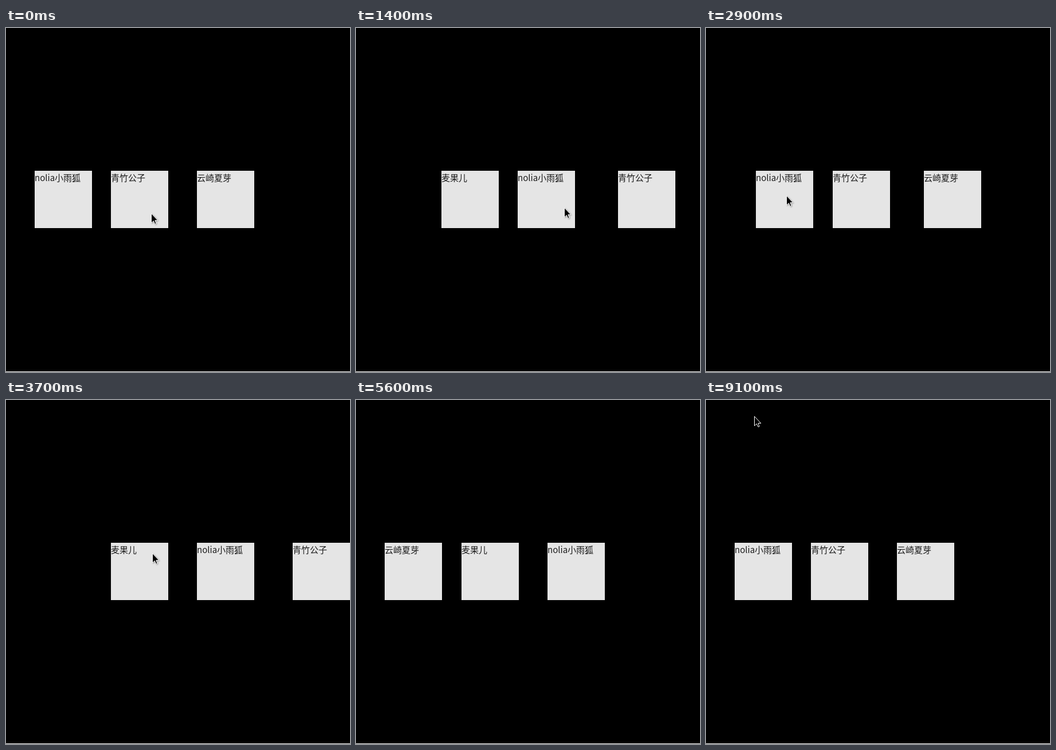
An HTML page for the animation above (9.2 s loop, 600 by 600 pixels).

```html
<!DOCTYPE html>
<html lang="zh">
<head>
<meta charset="utf-8">
<style>
html, body { margin: 0; width: 100%; height: 100%; overflow: hidden; background: #fff; }
#stage { position: relative; width: 600px; height: 599px; overflow: hidden; background: #000; }
.card {
  position: absolute; left: 0; top: 249px; width: 100px; height: 100px;
  background: #e5e5e5; color: #1c1c1c; white-space: nowrap;
  font: 15px/24px "Noto Sans CJK SC", "Noto Sans CJK", "Noto Sans", sans-serif;
}
#cursor {
  position: absolute; left: 0; top: 0; width: 16px; height: 24px; overflow: visible;
  filter: drop-shadow(1px 1px 1px rgba(0, 0, 0, .35));
}
</style>
</head>
<body>
<div id="stage">
  <div class="card"></div>
  <div class="card"></div>
  <div class="card"></div>
  <svg id="cursor"><path d="M.5 .6V17L4.3 13.5L6.6 18.6Q7.6 19.4 9 18.2L6.9 12.6H11.8Z" fill="#000" stroke="#fff"/></svg>
</div>
<script>
const LOOP = 9200, STEP = 100;
const PX_PER_CARD = 66.6, GLIDE = 100;
const names = ['nolia小雨狐', '青竹公子', '云崎夏芽', '麦果儿'];
const slots = [50, 550 / 3, 1000 / 3, 500];
const travel = [400 / 3, 400 / 3, 500 / 3];

// Pointer route: time, x, y
const route = [
  [0, 253, 323], [100, 247, 323], [700, 410, 318], [1000, 567, 316],
  [2100, 6, 307], [2800, 121, 296], [3500, 251, 267], [3700, 255, 267],
  [4400, 520, 285], [5200, 0, 250], [5400, 0, 0], [6200, 185, 174],
  [6300, 241, 310], [6900, 284, 312], [7100, 284, 312], [7500, 253, 310],
  [8100, 132, 300], [8400, 84, 28], [LOOP, 84, 28]
];
const drags = [[100, 2100], [2800, 3500], [3700, 5200], [6300, 8100]];
const hidden = [[5500, 6200], [8500, 9100]];

function pointer(t) {
  const i = route.findIndex(p => p[0] > t);
  const [t0, x0, y0] = route[i - 1], [t1, x1, y1] = route[i];
  const u = (t - t0) / (t1 - t0);
  return { x: x0 + (x1 - x0) * u, y: y0 + (y1 - y0) * u };
}

// Cards follow the pointer while dragged, then glide to the nearest stop.
function position(t) {
  let stop = 0, pos = 0;
  for (const [grab, release] of drags) {
    if (t <= grab) break;
    const moved = pointer(Math.min(t, release)).x - pointer(grab).x;
    const dragged = stop + moved / PX_PER_CARD;
    if (t <= release) return dragged;
    stop = Math.round(dragged);
    pos = stop + (dragged - stop) * Math.exp((release - t) / GLIDE);
  }
  return pos;
}

const cards = [...document.querySelectorAll('.card')];
const cursor = document.getElementById('cursor');
const place = (el, x, y) => {
  el.style.transform = `translate(${Math.round(x)}px, ${Math.round(y)}px)`;
};

function draw(t) {
  const pos = position(t), turn = Math.floor(pos), part = pos - turn;
  cards.forEach((card, i) => {
    const name = names[(((i - turn) % 4) + 4) % 4];
    if (card.textContent !== name) card.textContent = name;
    place(card, part > 0.99 ? slots[i + 1] : slots[i] + travel[i] * part, 0);
  });
  const { x, y } = pointer(t);
  const away = hidden.some(([from, to]) => t >= from && t < to);
  cursor.style.visibility = away ? 'hidden' : 'visible';
  place(cursor, x, y);
}

const start = performance.now();
function tick() {
  const t = (performance.now() - start) % LOOP;
  draw(Math.floor(t / STEP) * STEP);
  requestAnimationFrame(tick);
}
draw(0);
requestAnimationFrame(tick);
</script>
</body>
</html>
```
